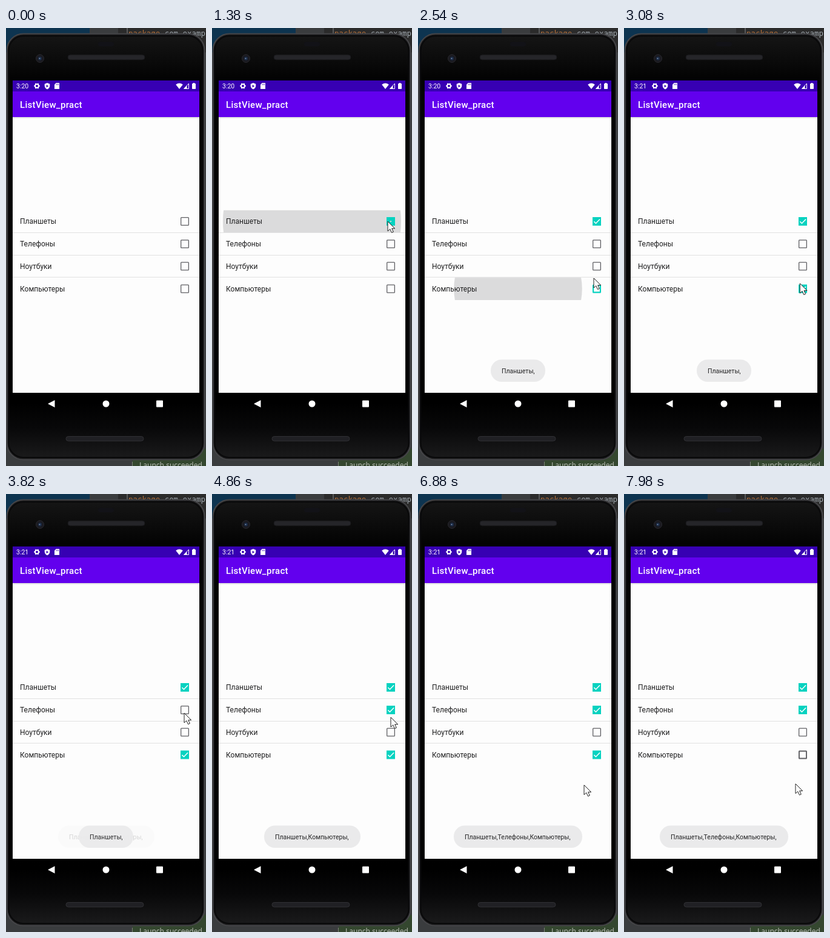
Animation, 330 px wide and 718 px high, one loop 8000 ms. Source, as an HTML page with a canvas:

```html
<!DOCTYPE html>
<html lang="ru">
<head>
<meta charset="utf-8">
<title>ListView_pract</title>
<style>
  html, body { margin: 0; width: 100%; height: 100%; overflow: hidden; background: #000; }
  canvas { display: block; width: 330px; height: 718px; }
</style>
</head>
<body>
<canvas id="stage"></canvas>
<script>
const W = 330, H = 718, LOOP = 8000;
const canvas = document.getElementById('stage');
const ctx = canvas.getContext('2d');
const scale = window.devicePixelRatio || 1;
canvas.width = W * scale;
canvas.height = H * scale;

const ACCENT = '#06d2c0', DARK = '#606064', PAPER = '#fdfdfd', STATUS = '#3700b3';
const rows = [
  { label: 'Планшеты', y: 317, on: 1236 },
  { label: 'Телефоны', y: 354, on: 4250 },
  { label: 'Ноутбуки', y: 390.5 },
  { label: 'Компьютеры', y: 427.5, on: 2515, off: 7650 },
];
const ripples = [
  { row: 0, start: 1236 }, { row: 3, start: 2515 },
  { row: 1, start: 4250 }, { row: 3, start: 7440 },
];
const toasts = [
  { text: 'Планшеты,', left: 120, right: 210, start: 1500, end: 3800 },
  { text: 'Планшеты,Компьютеры,', left: 86, right: 245, start: 3740, end: 6000 },
  { text: 'Планшеты,Телефоны,Компьютеры,', left: 59, right: 271, start: 5950, end: 9000 },
];
// time, x, y of the pointer tip
const pointerPath = [
  [300, 334, 560], [1100, 290, 317], [1600, 290, 317], [2350, 290, 413], [2540, 290, 410],
  [2950, 290, 424], [3700, 294, 359], [4400, 294, 359], [4860, 295, 366], [5700, 274, 477],
  [7000, 274, 477], [7350, 290, 428], [7650, 290, 428], [7950, 283, 475],
];

const clamp = v => Math.min(1, Math.max(0, v));
const ramp = (t, start, length) => clamp((t - start) / length);
const smooth = p => p * p * (3 - 2 * p);

function shape(path, fill, stroke, width = 1) {
  const p = typeof path === 'string' ? new Path2D(path) : path;
  if (fill) { ctx.fillStyle = fill; ctx.fill(p); }
  if (stroke) { ctx.strokeStyle = stroke; ctx.lineWidth = width; ctx.stroke(p); }
}
function box(x, y, w, h, r, fill, stroke, width) {
  const p = new Path2D();
  p.roundRect(x, y, w, h, r);
  shape(p, fill, stroke, width);
}
function disc(x, y, r, fill, stroke, width) {
  const p = new Path2D();
  p.arc(x, y, r, 0, 7);
  shape(p, fill, stroke, width);
}
function text(s, x, y, size, color, weight = 400, spacing = 0, family = 'Roboto, sans-serif') {
  ctx.font = `${weight} ${size}px ${family}`;
  ctx.letterSpacing = spacing + 'px';
  ctx.fillStyle = color;
  ctx.fillText(s, x, y);
}
function gradient(x0, y0, x1, y1, ...stops) {
  const g = ctx.createLinearGradient(x0, y0, x1, y1);
  stops.forEach(([at, color]) => g.addColorStop(at, color));
  return g;
}

function drawDesktop() {
  box(0, 0, W, H, 0, '#3a3c3e');
  box(0, 0, 138, 40, 0, '#0d3450');
  box(185, 0, 145, 40, 0, '#2b2b2b');
  box(199.5, 0, 1, 14, 0, '#85888a');
  const mono = '"DejaVu Sans Mono", monospace';
  text('package', 202, 13, 12.4, '#b8713a', 400, 0, mono);
  text('com.example', 261.7, 13, 12.4, '#a3abb2', 400, 0, mono);
  box(209, 690, 121, 28, 0, '#34472f');
  box(208, 711, 1, 7, 0, '#7c8478');
  text('Launch succeeded', 220, 721, 12, '#b4b8b0', 400, 0, '"Noto Sans", sans-serif');
}

function drawPhone() {
  box(1.5, 9.5, 326, 698, 27, '#19191a', '#454548', 2);
  box(4.5, 13, 320, 691, 24, gradient(0, 13, 0, 704,
    [0, '#151515'], [0.1, '#030303'], [0.87, '#000'], [0.93, '#080809'], [1, '#1a1a1b']), '#09090a', 2);
  box(152, 23, 26, 7, 3, '#121217');
  box(102, 44, 127, 8, 4, '#252529', '#18181b');
  box(99, 669.5, 128, 7.5, 4, '#202024', '#303034');
  disc(56, 50, 6.5, '#1a1a20', '#29292e');
  disc(56, 50, 3, '#1b2c48');
  disc(55.5, 50, 1, '#7c8ca5');
  shape('M69 616L80.5 610V622Z', '#fff');
  disc(165, 616, 5.5, '#fff');
  box(248, 610.5, 11, 11, 1, '#fff');
}

function drawBars(t) {
  box(11, 86, 308, 18, 0, STATUS);
  box(11, 104, 308, 42, 0, '#6200ee');
  text(t < 2900 ? '3:20' : '3:21', 17, 99, 10.5, '#fff');
  text('ListView_pract', 23, 131, 15, '#fff', 500, 0.3);

  disc(51, 95, 2.9, null, '#fff', 2);
  for (let i = 0; i < 6; i++) {
    const a = i * Math.PI / 3;
    disc(51 + 4 * Math.cos(a), 95 + 4 * Math.sin(a), 1, '#fff');
  }
  shape('M68 90L72.3 91.8V95Q72 98.8 68 100.5Q64 98.8 63.7 95V91.8Z', '#fff');
  shape('M66.6 93L70 95.2L66.6 97.4Z', STATUS);
  shape('M82.6 90H88V100H80V92.7Z', '#fff');
  shape('M83 91.5V93.5M84.8 91.5V93.5M86.5 91.5V93.5', null, STATUS, 0.8);
  shape('M286 100L280.2 92.8Q286 88 291.8 92.8Z', '#fff');
  shape('M293.5 99.5L301.5 91V99.5Z', null, '#fff', 1);
  shape('M293.5 99.5L298.5 94.5V99.5Z', '#fff');
  box(307, 91, 6, 9, 0.8, '#fff');
  box(308.7, 90, 2.6, 2, 0, '#fff');
}

function drawRipple(t, { row, start }) {
  const fade = 1 - ramp(t, start + 205, 280);
  if (t < start || fade <= 0) return;
  const p = ramp(t, start, 225);
  ctx.save();
  ctx.beginPath();
  ctx.rect(11, rows[row].y - 18.2, 308, 36.6);
  ctx.clip();
  ctx.globalAlpha = fade;
  disc(165, rows[row].y, 92 + 63 * p * (2 - p), '#dbdbdc');
  ctx.restore();
}

function drawCheckbox(t, { y, on = Infinity, off = Infinity }) {
  const checked = t >= on && t < off;
  const amount = t < off ? ramp(t, on, 350) : 1 - ramp(t, off, 350);
  const border = 1.3 + 5.7 * clamp(amount * 2);
  const inset = border / 2;
  box(288 + inset, y - 7 + inset, 14 - border, 14 - border, Math.max(0, 1.5 - inset),
    null, checked ? ACCENT : DARK, border);
  const tick = clamp(amount * 2 - 1);
  if (tick > 0) {
    ctx.save();
    ctx.setLineDash([14.5 * tick, 30]);
    shape(`M290.3 ${y + 0.2}L293.5 ${y + 3.3}L300 ${y - 3.4}`, null, '#fff', 1.5);
    ctx.restore();
  }
}

function drawList(t) {
  box(11, 146, 308, 452, 0, PAPER);
  box(11, 146, 308, 3, 0, gradient(0, 146, 0, 149, [0, '#d6d6d8'], [1, PAPER]));
  ripples.forEach(r => drawRipple(t, r));
  [335, 372, 408].forEach(y => box(11, y, 308, 1, 0, '#e2e2e2'));
  rows.forEach(row => {
    text(row.label, 23, row.y + 4.3, 12, '#1f1f20');
    drawCheckbox(t, row);
  });
}

function drawToast(t, { text: label, left, right, start, end }) {
  ctx.globalAlpha = ramp(t, start, 500) * (1 - ramp(t, end, 400));
  if (ctx.globalAlpha > 0) {
    box(left, 543.5, right - left, 36.5, 18, '#eaeaeb');
    text(label, left + 18, 565.8, 10.5, '#232324');
  }
  ctx.globalAlpha = 1;
}

function drawPointer(t) {
  if (t < pointerPath[0][0]) return;
  let i = pointerPath.findIndex(k => k[0] > t);
  if (i < 0) i = pointerPath.length - 1;
  const [t0, x0, y0] = pointerPath[i - 1], [t1, x1, y1] = pointerPath[i];
  const p = smooth(ramp(t, t0, t1 - t0));
  ctx.save();
  ctx.translate(x0 + (x1 - x0) * p, y0 + (y1 - y0) * p);
  shape('M0 0V16L3.8 12.6L6.5 18.5L9.3 17.2L6.7 11.7H11.7Z', '#fff', '#222', 1);
  ctx.restore();
}

function draw(t) {
  ctx.setTransform(scale, 0, 0, scale, 0, 0);
  drawDesktop();
  drawPhone();
  drawList(t);
  drawBars(t);
  // the newest toast lies beneath the one it replaces
  [...toasts].reverse().forEach(toast => drawToast(t, toast));
  drawPointer(t);
}

const began = performance.now();
function frame() {
  draw((performance.now() - began) % LOOP);
  requestAnimationFrame(frame);
}
frame();
</script>
</body>
</html>
```
